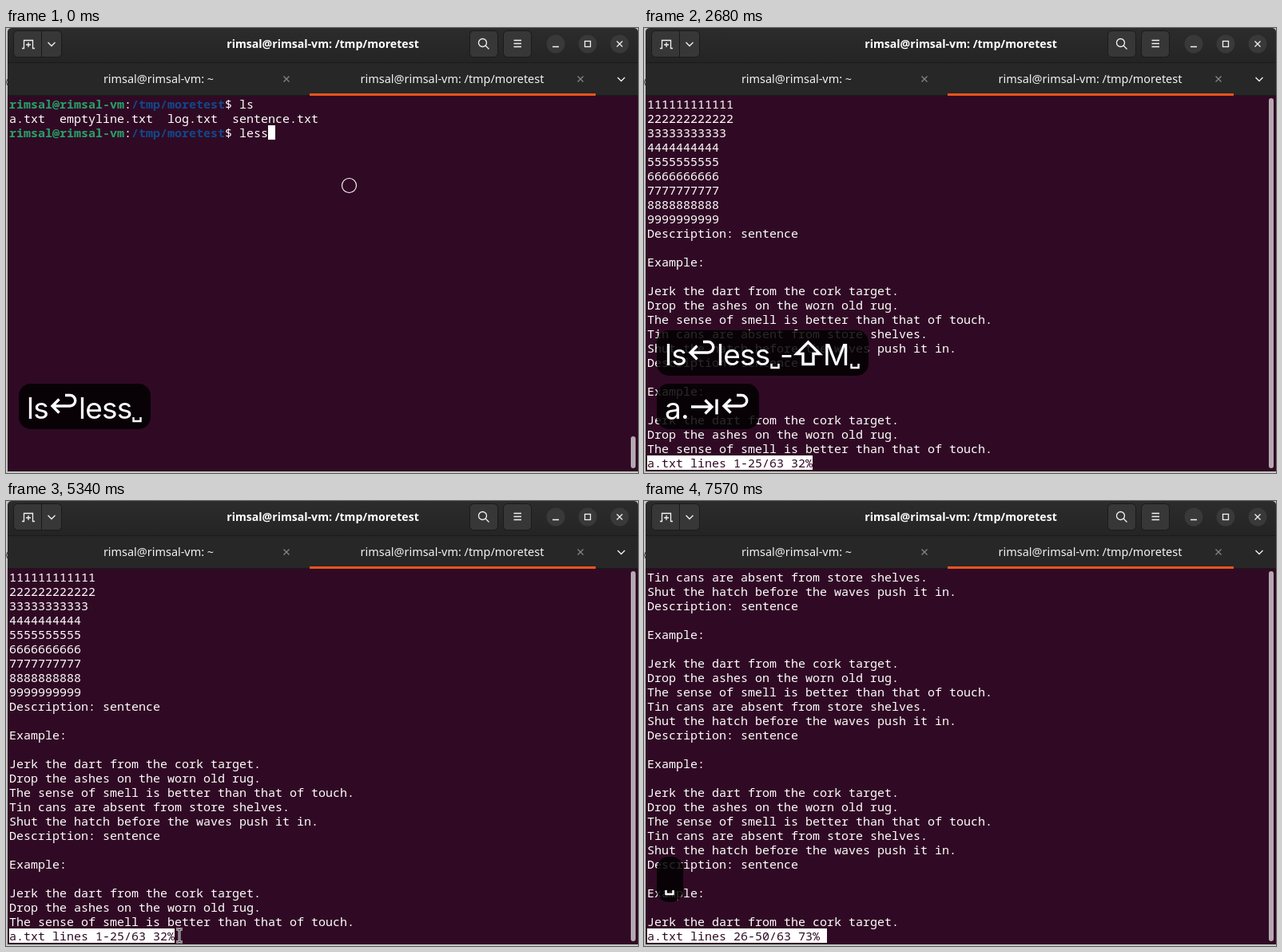
Recreate the animation shown at these times as an HTML page. Size 791 by 558 pixels, loop 8 s.

```html
<!DOCTYPE html>
<html lang="en">
<head>
<meta charset="utf-8">
<title>Terminal: less -M</title>
<style>
  html, body { margin: 0; width: 100%; height: 100%; overflow: hidden; background: #c4c8c2; }
  svg { display: block; width: 791px; height: 558px; }
  text { white-space: pre; }
  .ui { font: 14.45px "Noto Sans", "Open Sans", sans-serif; fill: #f2f2f2; text-anchor: middle; }
  .title { font-weight: 700; font-size: 14.1px; fill: #fff; }
  .mono { font: 15px "Noto Sans Mono", "DejaVu Sans Mono", monospace; fill: #fff; }
  .user { font-weight: 700; fill: #26a269; }
  .path { font-weight: 700; fill: #12488b; }
  .dark { fill: #300a24; }
  .btn { fill: #373737; stroke: #1a1a1a; }
  .icon { fill: none; stroke: #f2f2f2; stroke-width: 1.3; }
  .dim { stroke: #858585; }
  .key { font: 37px Inter, Roboto, sans-serif; letter-spacing: -.8px; fill: #fff; }
  .sym { fill: none; stroke: #fff; stroke-width: 3.4; }
  .thin { stroke-width: 2.4; }
</style>
</head>
<body>
<svg viewBox="0 0 791 558" xmlns="http://www.w3.org/2000/svg">
  <defs>
    <linearGradient id="bar" x2="0" y2="1">
      <stop offset="0" stop-color="#2c2c2c"/><stop offset="1" stop-color="#242424"/>
    </linearGradient>
    <path id="cross" d="M-3.500-3.500L3.500 3.500M3.500-3.500L-3.500 3.500"/>
    <path id="chevron" d="M-4.500-2L0 2.500 4.500-2"/>
    <path id="beam" d="M-4-8H-1Q0-8 0-7Q0-8 1-8H4M0-7V7M-4 8H-1Q0 8 0 7Q0 8 1 8H4"/>
  </defs>
  <path d="M2 64q-3 4 0 8" fill="none" stroke="#333"/>
  <path d="M2 556V6q0-6 6-6H785q6 0 6 6V556z" fill="#300a24"/>
  <path d="M2 44V6q0-6 6-6H785q6 0 6 6V44z" fill="url(#bar)"/>
  <rect x="2" y="43" width="789" height="42" fill="#1a1a1a"/>
  <rect x="2" y="44" width="789" height="40" fill="#272727"/>
  <rect x="380" y="82" width="358" height="3" fill="#e95420"/>

  <rect class="btn" x="9.5" y="3.5" width="60" height="33" rx="5"/>
  <path d="M44.500 4V36" stroke="#1a1a1a"/>
  <rect class="btn" x="580.5" y="3.5" width="35" height="33" rx="5"/>
  <rect class="btn" x="622.5" y="3.5" width="35" height="33" rx="5"/>
  <g fill="#393939">
    <circle cx="688" cy="20" r="11.500"/><circle cx="728" cy="20" r="11.500"/><circle cx="768" cy="20" r="11.500"/>
  </g>
  <g class="icon">
    <path d="M20 25.500H22.500V15.500H33.500V25.500H36M28 18V24M25 21H31"/>
    <circle cx="596.500" cy="18.500" r="5"/><path d="M600 22L604.500 26.500"/>
    <path d="M635.500 15.500H645M635.500 19.500H645M635.500 23.500H645M684 23.500H692"/>
    <rect x="724.500" y="16.500" width="7" height="7"/>
    <use href="#chevron" x="57" y="20"/><use href="#chevron" x="770" y="64"/>
    <use href="#cross" x="768" y="20"/>
    <g class="dim"><use href="#cross" x="351" y="64"/><use href="#cross" x="719" y="64"/></g>
  </g>
  <text class="ui title" x="396.5" y="25">rimsal@rimsal-vm: /tmp/moretest</text>
  <text class="ui" x="191" y="69">rimsal@rimsal-vm: ~</text>
  <text class="ui" x="558.5" y="69">rimsal@rimsal-vm: /tmp/moretest</text>

  <g id="shell"></g>
  <g id="pager"></g>
  <rect id="picked" x="211" y="536" width="567" height="18" fill="#fff"/>
  <rect id="cell" x="103" y="536" width="9" height="18" fill="#300a24"/>
  <rect id="cursor" width="9" height="18"/>
  <rect id="scroll" x="782" width="6" rx="3" fill="#b5a8b0"/>
  <circle id="ring" cx="429.5" cy="197.5" r="9" fill="none" stroke="#fff" stroke-width="1.1"/>
  <g id="keys"></g>
  <g id="pointer" fill="none">
    <use href="#beam" stroke="#fff" stroke-width="2.800"/><use href="#beam" stroke="#111"/>
  </g>
</svg>
<script>
const LOOP = 8000, TICK = 148.3;          // the picture changes once per tick
const OPEN = 14, NEXT = 51;               // ticks: pager opens, next page
const ROW = 18, COL = 9, PANEL_X = 16, PANEL_STEP = 67;

const $ = id => document.getElementById(id);
const clamp = v => Math.max(0, Math.min(1, v));
const ease = v => v * v * (3 - 2 * v);
const show = (el, on) => el.setAttribute('visibility', on ? 'visible' : 'hidden');
const set = (el, attrs) => { for (const k in attrs) el.setAttribute(k, attrs[k]); };
const colX = c => 4 + c * COL;
const rowY = r => 86 + r * ROW;
const line = (r, s, c = 0, cls = '') =>
  `<text class="mono ${cls}" x="${colX(c)}" y="${rowY(r) + 15}">${s}</text>`;

// Shell screen
const prompt = r => line(r, 'rimsal@rimsal-vm', 0, 'user') + line(r, ':', 16) +
  line(r, '/tmp/moretest', 17, 'path') + line(r, '$', 30);
$('shell').innerHTML = prompt(0) + line(0, 'ls', 32) +
  line(1, 'a.txt  emptyline.txt  log.txt  sentence.txt') +
  prompt(2) + line(2, '', 32);
const cmdText = $('shell').lastChild;

// File shown in the pager
const block = ['Description: sentence', '', 'Example:', '',
  'Jerk the dart from the cork target.', 'Drop the ashes on the worn old rug.',
  'The sense of smell is better than that of touch.',
  'Tin cans are absent from store shelves.', 'Shut the hatch before the waves push it in.'];
const fileLine = i => i < 9 ? String(i + 1).repeat(Math.max(10, Math.min(12, 13 - i)))
  : block[(i - 9) % block.length];

function page(first, status) {
  let out = '';
  for (let r = 0; r < 25; r++) out += line(r, fileLine(first + r));
  return `<g>${out}<rect x="4" y="${rowY(25)}" width="${status.length * COL}" height="18" fill="#fff"/>` +
    line(25, status, 0, 'dark') + '</g>';
}
const status = ['a.txt lines 1-25/63 32%', 'a.txt lines 26-50/63 73%'];
$('pager').innerHTML = page(0, status[0]) + page(25, status[1]);
const pages = [...$('pager').children];

// Key display: each key has a drawing, a width, the tick it is pressed and its echo
const key = (tick, s, width, echo = s) =>
  ({ tick, width, echo, art: `<text class="key" y="490">${s}</text>` });
const sym = (d, width, cls = '') => (tick, echo = '') =>
  ({ tick, width, echo, art: `<path class="sym ${cls}" d="${d}"/>` });
const enter = sym('M4 474H26A6.750 6.750 0 0 0 26 460.500H20M12.500 465.500L4 474L12.500 482.500', 37);
const space = sym('M1.500 488V493H10.500V488', 12, 'thin');
const tab = sym('M1 475H26M18.500 466.500L27 475L18.500 483.500M33 465.500V484.500', 38);
const shift = sym('M17.500 461L32 475.500H24V488.500H11V475.500H3Z', 36);

const panels = [
  { fadeEnd: 24, keys: [key(0, 'ls', 28, ''), enter(0), key(0, 'less', 67), space(0, ' '),
    key(1, '-', 18), shift(3), key(4, 'M', 34), space(5, ' ')] },
  { fadeEnd: 28, keys: [key(10, 'a', 20), key(11, '.', 12), tab(12, 'txt '), enter(OPEN)] },
  { fadeEnd: Infinity, keys: [space(NEXT)] }
];
for (const p of panels) {
  let x = PANEL_X + 10, art = '';
  for (const k of p.keys) {
    art += `<g transform="translate(${x} 0)">${k.art}</g>`;
    k.right = x += k.width;
  }
  p.g = document.createElementNS('http://www.w3.org/2000/svg', 'g');
  p.g.innerHTML =
    `<rect x="${PANEL_X}" y="446" height="57" rx="15" fill="#000" fill-opacity=".84"/>` + art;
  $('keys').append(p.g);
}

function drawPanel({ g, keys, fadeEnd }, n, lift) {
  const down = keys.filter(k => k.tick <= n);
  const opacity = clamp((fadeEnd - n) / 3);
  set(g, { opacity, transform: `translate(0 ${-lift})`, display: down.length ? 'inline' : 'none' });
  if (!down.length) return;
  set(g.firstChild, { width: down[down.length - 1].right + 11 - PANEL_X });
  keys.forEach((k, i) => set(g.children[i + 1], { display: k.tick <= n ? 'inline' : 'none' }));
}

// A typed space echoes one tick late
const echoed = n => panels.slice(0, 2).flatMap(p => p.keys)
  .filter(k => k.tick + (k.echo === ' ') <= n).map(k => k.echo).join('');

// Pointer strokes: start tick, end tick, end point
const strokes = [[19, 27, 106, 548], [30, 34, 217, 545], [37, 40, 268.5, 500], [43, 46, 356, 348]];
function pointerAt(n) {
  let x = 395, y = 238;
  for (const [from, to, toX, toY] of strokes) {
    const k = ease(clamp((n - from) / (to - from)));
    x += (toX - x) * k;
    y += (toY - y) * k;
  }
  return [x, y];
}

function draw(t) {
  const n = Math.floor((t + 10) / TICK);
  const less = n >= OPEN, second = n >= NEXT;
  const picked = n >= 37 && n < 42;
  const cmd = echoed(n);
  show($('shell'), !less);
  cmdText.textContent = cmd;
  show(pages[0], less && !second);
  show(pages[1], second);
  show($('picked'), picked);
  show($('cell'), n >= 27 && n < 36);
  show($('ring'), n < 1);

  // The cursor blinks every four ticks, starting afresh on a key press
  const idle = less ? n - (second ? NEXT : OPEN) : 0;
  show($('cursor'), Math.floor(idle / 4) % 2 === 0);
  set($('cursor'), {
    x: colX(less ? status[+second].length : 32 + cmd.length),
    y: rowY(less ? 25 : 2),
    fill: picked ? '#300a24' : '#fff'
  });
  set($('scroll'), less ? { y: 88, height: 464 } : { y: 512, height: 40 });

  panels.forEach((p, i) => drawPanel(p, n, i === 0 && n >= 10 ? PANEL_STEP : 0));
  show($('pointer'), n >= 19 && !second);
  set($('pointer'), { transform: `translate(${pointerAt(n)})` });
}

const start = performance.now();
(function tick() {
  draw((performance.now() - start) % LOOP);
  requestAnimationFrame(tick);
})();
</script>
</body>
</html>
```
